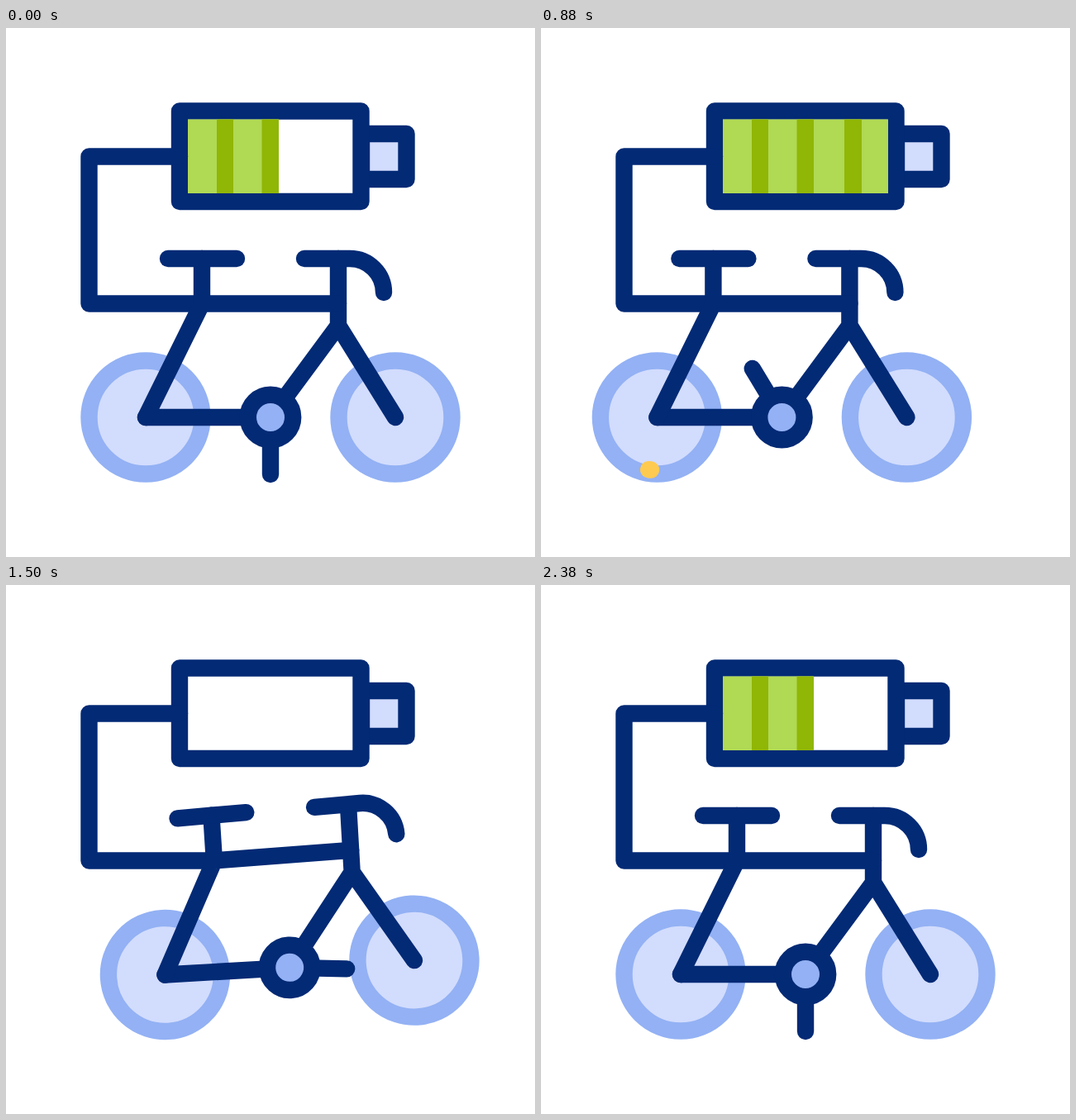
These frames come from a looping animation (640 px wide and 640 px high, 2.4 s). An HTML page:

```html
<!DOCTYPE html>
<html lang="en">
<head>
<meta charset="utf-8">
<title>Electric bike</title>
<style>
  html, body { margin: 0; height: 100%; overflow: hidden; background: #fff; }
  svg { display: block; width: 100vw; height: 100vh; }
  .line { fill: none; stroke: #032a75; stroke-width: 20.4; stroke-linecap: round; stroke-linejoin: round; }
  .wheel { fill: #d2dcfd; stroke: #93b1f4; stroke-width: 20.4; }
  .streak { fill: none; stroke: #ffca50; stroke-width: 20.5; stroke-linecap: round; }
</style>
</head>
<body>
<svg viewBox="0 0 640 640">
  <path class="line" style="fill:#d2dcfd" d="M430 128H484.5V183H430Z"/>
  <path class="line" style="fill:#fff" d="M210 100.5H429.5V210H210Z"/>
  <g id="cells"></g>
  <path id="cable" class="line"/>
  <g id="bike">
    <circle class="wheel" cx="169" cy="471" r="68.5"/>
    <circle class="wheel" cx="471" cy="471" r="68.5"/>
    <path class="line" d="M169 471H320L402 360L471 471M402 279V360"/>
    <path id="frame" class="line"/>
    <path id="saddle" class="line" d="M196 279H279"/>
    <path id="handle" class="line" d="M361 279H416A41 41 0 0 1 457 320"/>
    <path id="pedal" class="line" d="M320 471H389"/>
    <circle class="line" style="fill:#93b1f4" cx="320" cy="471" r="27.2"/>
  </g>
  <g id="streaks"></g>
</svg>
<script>
const LOOP = 2400;
const $ = id => document.getElementById(id);
const clamp = (v, lo, hi) => Math.min(hi, Math.max(lo, v));

function add(parent, tag, attrs) {
  const el = document.createElementNS('http://www.w3.org/2000/svg', tag);
  for (const name in attrs) el.setAttribute(name, attrs[name]);
  return parent.appendChild(el);
}

// Smooth curve through [time, value] keys that never overshoots them.
function track(keys) {
  const slope = keys.slice(1).map(([t, v], i) => (v - keys[i][1]) / (t - keys[i][0]));
  const tangent = keys.map((_, i) => {
    const a = slope[i - 1], b = slope[i];
    return a * b > 0 ? 2 * a * b / (a + b) : 0;
  });
  return t => {
    let i = 0;
    while (i < keys.length - 2 && t > keys[i + 1][0]) i++;
    const [t0, v0] = keys[i], [t1, v1] = keys[i + 1];
    const h = t1 - t0, u = clamp((t - t0) / h, 0, 1), w = 1 - u;
    return v0 * w * w * (1 + 2 * u) + v1 * u * u * (3 - 2 * u)
      + h * u * w * (tangent[i] * w - tangent[i + 1] * u);
  };
}

const shift = track([[0, 0], [120, 0], [360, -14.8], [600, -28.6], [880, -28.6], [1080, 12],
  [1220, 28], [1320, 31], [1500, 23.5], [1660, 10], [1900, 0], [LOOP, 0]]);
const lift = track([[900, 0], [1080, -3], [1500, 0.5], [1640, 3], [1900, 0]]);
const tilt = track([[900, 0], [1080, -2.1], [1300, -4], [1500, -3.3], [1760, 0]]);
const flex = track([[900, 0], [1080, 1], [1500, 0.35], [1760, 0]]);
const crank = track([[0, 90], [360, 101.6], [880, 238.6], [1080, 319], [1220, 510],
  [1500, 721], [2000, 799], [LOOP, 810]]);

// [start time, number of charged cells]
const charge = [[0, 2], [240, 3], [560, 4], [920, 3], [1000, 2], [1060, 1], [1200, 0], [1660, 1], [1860, 2]];
const cells = [[220, 255, 275], [275, 309.5, 330], [330, 367, 388], [388, 420, 420]].map(([x, dark, end]) => {
  const g = add($('cells'), 'g', {});
  const box = { y: 110.5, height: 89.5 };
  add(g, 'rect', { x, width: end - x, fill: '#b0d954', ...box });
  add(g, 'rect', { x: dark, width: end - dark, fill: '#90b606', ...box });
  return g;
});

const streaks = [
  { x: 381, y: 385.3, slope: 0.04, reach: 80, len: 47, start: 180, time: 419 },
  { x: 383, y: 343, slope: 0.04, reach: 80, len: 47, start: 350, time: 419 },
  { x: 133, y: 534.5, slope: 0.1, reach: 80, len: 48, start: 870, time: 488 },
  { x: 133, y: 488.5, slope: 0.08, reach: 80, len: 53, start: 885, time: 432 }
].map(s => ({ ...s, el: add($('streaks'), 'path', { class: 'streak' }) }));

function drawStreak({ x, y, slope, reach, len, start, time, el }, t) {
  const p = (t - start) / time, run = p * (reach + len);
  const at = d => `${x - d} ${y - d * slope}`;
  el.style.display = p > 0 && p < 1 ? '' : 'none';
  el.setAttribute('d', `M${at(clamp(run - len, 0, reach))}L${at(clamp(run, 0, reach) + 0.01)}`);
}

function draw(t) {
  const dx = shift(t), dy = lift(t), angle = tilt(t), f = flex(t);
  const set = (id, name, value) => $(id).setAttribute(name, value);

  const jx = 237 - 2 * f, jy = 333.5 + 9 * f;
  set('bike', 'transform', `translate(${dx} ${dy}) rotate(${angle} 169 471)`);
  set('frame', 'd', `M169 471L${jx} ${jy}L402 333.5M${jx} ${jy}L${237 - 3 * f} ${279 + 8 * f}`);
  set('saddle', 'transform', `translate(${-3 * f} ${8 * f}) rotate(${-4.8 * f} 237 279)`);
  set('handle', 'transform', `rotate(${-4.9 * f} 361 279)`);
  set('pedal', 'transform', `rotate(${crank(t) - angle} 320 471)`);

  // The cable follows the frame joint in stage coordinates.
  const a = angle * Math.PI / 180, x = jx - 169, y = jy - 471;
  const endX = 169 + dx + x * Math.cos(a) - y * Math.sin(a);
  const endY = 471 + dy + x * Math.sin(a) + y * Math.cos(a);
  set('cable', 'd', `M210 155.5H100.5V333.5H${endX - 8}L${endX} ${endY}`);

  const count = charge.filter(([start]) => t >= start).pop()[1];
  cells.forEach((g, i) => g.style.display = i < count ? '' : 'none');
  streaks.forEach(s => drawStreak(s, t));
}

const begin = performance.now();
function tick() {
  draw((performance.now() - begin) % LOOP);
  requestAnimationFrame(tick);
}
tick();
</script>
</body>
</html>
```
